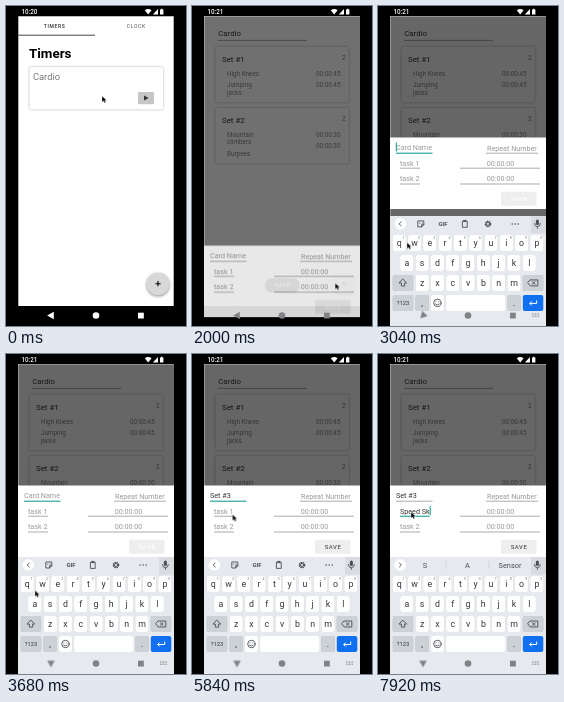
These frames come from a looping animation (180x320 px, 8000 ms). An HTML page:

```html
<!DOCTYPE html>
<html lang="en">
<head>
<meta charset="utf-8">
<title>Timers</title>
<style>
html, body { margin: 0; width: 100%; height: 100%; overflow: hidden; background: #000; }
svg { display: block; width: 100vw; height: 100vh; }
text { font-family: Roboto, Arial, sans-serif; white-space: pre; }
.mid { text-anchor: middle; }
.end { text-anchor: end; }
.card { fill: #fff; filter: drop-shadow(0 .6px 1px #0005); }
.head { font-size: 7.9px; fill: #333; }
.item { font-size: 6.35px; fill: #858585; }
.field { font-size: 7.2px; fill: #999; }
.rule { stroke: #888; stroke-width: .7; }
.focus { stroke: #009688; stroke-width: 1; }
.key { fill: #fff; filter: drop-shadow(0 .5px 0 #b5b8bd); }
.dark { fill: #ccd1d6; }
.letter { font-size: 8.8px; fill: #33363a; }
.tiny { font-size: 3.6px; fill: #777; }
.hint { font-size: 7.4px; fill: #4b4f54; }
.line { fill: none; stroke: #4b4f54; stroke-width: .9; stroke-linecap: round; stroke-linejoin: round; }
.a { animation: 8s linear infinite; }

#minute0 { animation-name: until4; }
#minute1 { animation-name: from4; }
#edit { animation-name: open; }
#ripple { animation-name: ripple; transform-origin: 146px 279px; }
#dim { animation-name: dim; }
#sheet { animation-name: sheet; }
#keys { animation-name: keys; }
#back { animation-name: back; transform-origin: 45px 309.5px; }
#hideKeys { animation-name: from37; }
#pointer { animation-name: pointer; }

@keyframes until4 { 0%, 3.99% { opacity: 1 } 4%, 100% { opacity: 0 } }
@keyframes from4 { 0%, 3.99% { opacity: 0 } 4%, 100% { opacity: 1 } }
@keyframes from37 { 0%, 37% { opacity: 0 } 37.5%, 100% { opacity: 1 } }
@keyframes open {
  0%, 7% { opacity: 0; transform: translateY(24px); animation-timing-function: ease-out }
  10%, 100% { opacity: 1; transform: none }
}
@keyframes ripple {
  0%, 21.5% { opacity: 0; transform: scale(.3) }
  23% { opacity: .8; transform: scale(.8) }
  25%, 100% { opacity: 0; transform: scale(1.6) }
}
@keyframes dim { 0%, 23.3% { opacity: 0 } 25% { opacity: .56 } 26.5%, 100% { opacity: .6 } }
@keyframes sheet {
  0%, 23.4% { opacity: 0; transform: translateY(189px) }
  25% { opacity: .84; transform: translateY(108.3px); animation-timing-function: ease-out }
  26.5%, 36% { opacity: 1; transform: translateY(97px) }
  37.4%, 100% { opacity: 1; transform: none }
}
@keyframes keys {
  0%, 36% { transform: translateY(118px); animation-timing-function: ease-out }
  38% { transform: translateY(7px) }
  39%, 100% { transform: none }
}
@keyframes back { 0%, 37% { transform: none } 39%, 100% { transform: rotate(-90deg) } }
@keyframes pointer {
  0%, 11% { transform: translate(96px, 90px); animation-timing-function: ease-in-out }
  20%, 23% { transform: translate(144.5px, 277.5px) }
  25.2% { transform: translate(143px, 277px); animation-timing-function: ease-in-out }
  28.6% { transform: translate(26px, 220px); animation-timing-function: ease-out }
  34%, 61% { transform: translate(29px, 236.5px); animation-timing-function: ease-in-out }
  68%, 79% { transform: translate(40.5px, 160.5px) }
  80.5%, 100% { transform: translate(33px, 158px) }
}
</style>
</head>
<body>
<svg viewBox="0 0 180 320" preserveAspectRatio="none">
  <clipPath id="screen"><rect x="12.3" y="10.3" width="155.4" height="309.7"/></clipPath>
  <rect width="180" height="320"/>

  <g fill="#fff" font-size="6.3" font-weight="500">
    <text id="minute0" class="a" x="15.4" y="8">10:20</text>
    <text id="minute1" class="a" x="15.4" y="8">10:21</text>
    <path d="M138.8 4.2q3.4-2.6 6.8 0l-3.4 4.2zM152 2.9v5.6h-5.2zM154 3.4h1v-.7h1.4v.7h1v5.1h-3.4z"/>
  </g>

  <g clip-path="url(#screen)">
    <rect x="12" y="10" width="156" height="290.5" fill="#fff"/>
    <g>
      <text class="mid" x="48.6" y="22" font-size="5" letter-spacing=".65" font-weight="500" fill="#333">TIMERS</text>
      <text class="mid" x="130.3" y="22" font-size="5" letter-spacing=".65" font-weight="500" fill="#777">CLOCK</text>
      <path d="M12 29.2H89" stroke="#333" stroke-width=".9"/>
      <text x="23" y="52" font-size="13.4" font-weight="700">Timers</text>
      <rect class="card" x="23.5" y="61" width="133.5" height="42.5" rx="1.5"/>
      <text x="27" y="74.2" font-size="9.3" fill="#777">Cardio</text>
      <rect x="132" y="86" width="16" height="12.3" rx="1" fill="#c6c6c6"/>
      <path d="M138 89.6v5l4.6-2.5z" fill="#333"/>
    </g>

    <g id="edit" class="a">
      <rect x="12" y="10" width="156" height="290.5" fill="#fff"/>
      <text x="26.3" y="30" font-size="7.8" fill="#333">Cardio</text>
      <path class="rule" d="M26 34.4H115"/>
      <rect class="card" x="23.5" y="40.8" width="133.3" height="55.5" rx="1.5"/>
      <rect class="card" x="23.5" y="102" width="133.3" height="55.5" rx="1.5"/>
      <g id="sets"></g>
      <rect x="73.2" y="272.2" width="34.2" height="14.2" rx="5.8"/>
      <text class="mid" x="90.5" y="281.4" font-size="5.9" letter-spacing=".4" font-weight="700" fill="#fff">SAVE</text>
    </g>

    <circle cx="152" cy="278" r="11.3" fill="#d8d8d8" style="filter:drop-shadow(0 1px 1.5px #0007)"/>
    <circle id="ripple" class="a" cx="146" cy="279" r="5" fill="#aaa"/>
    <path d="M149.4 277.7h5.2m-2.6-2.6v5.2" stroke="#000" stroke-width="1.1"/>

    <rect x="12" y="300" width="156" height="20"/>
    <rect id="dim" class="a" x="12" y="10" width="156" height="310"/>

    <g id="sheet" class="a">
      <rect x="12" y="131.5" width="156" height="71.5" fill="#fff"/>
      <text id="name" class="field" x="18" y="143.7"></text>
      <path id="nameRule" class="rule" d="M18 147.2H54.5"/>
      <text class="field" x="109" y="144.5">Repeat Number</text>
      <path class="rule" d="M108 147.2H160"/>
      <text id="task" class="field" x="22" y="159.5"></text>
      <path id="taskRule" class="rule"/>
      <text class="field" x="108.7" y="159.5">00:00:00</text>
      <path class="rule" d="M82 162.2H162"/>
      <text class="field" x="22" y="175">task 2</text>
      <text class="field" x="108.7" y="175">00:00:00</text>
      <path class="rule" d="M22 178H42M82 178H162"/>
      <rect x="123" y="185.8" width="35.5" height="14" rx="1.5" fill="#eee"/>
      <text id="save" class="mid" x="141" y="195.1" font-size="6" letter-spacing=".5" font-weight="500">SAVE</text>
      <path id="caret" stroke="#009688" stroke-width="1"/>
    </g>

    <g id="keys" class="a">
      <rect x="12" y="203" width="156" height="124.5" fill="#e6e9ed"/>
      <rect x="153" y="203" width="15" height="17.5" fill="#d8dbdf"/>
      <circle cx="22.3" cy="211" r="5.8" fill="#fff"/>
      <path id="chevron" class="line"/>
      <g id="tools">
        <path class="line" d="M40.2 208h5.6v3.8l-2.2 2.2h-3.4zM45.8 211.8h-2.2v2.2M41.6 210.2h.3m2.2 0h.3M84.8 208.2h4.4v6.2h-4.4zM86 207.4h2v1.2h-2z"/>
        <text class="mid" x="65" y="213.3" font-size="6" font-weight="700" fill="#4b4f54">GIF</text>
        <circle class="line" cx="110" cy="211" r="2.6" style="stroke-width:1.4;stroke-dasharray:1.5 .6;stroke-linecap:butt"/>
        <circle class="line" cx="110" cy="211" r="1.6"/>
        <path d="M134.2 211h.01m3 0h.01m3 0h.01" class="line" style="stroke-width:1.5"/>
      </g>
      <g id="hints">
        <path d="M68 207v8M111 207v8" stroke="#c4c7cb" stroke-width=".6"/>
        <text class="hint mid" x="47" y="213.5"></text>
        <text class="hint mid" x="89.5" y="213.5"></text>
        <text class="hint mid" x="132" y="213.5"></text>
        <g id="emoji">
          <path d="M128.5 207l8 6.5-7 1.5z" fill="#332e1c"/>
          <path d="M129 208l3 5-2 1.5z" fill="#d9b33c"/>
        </g>
      </g>
      <rect x="157.9" y="206.5" width="3" height="5.6" rx="1.5" fill="#4b4f54"/>
      <path class="line" d="M156.5 210.5q0 3.2 2.9 3.2t2.9-3.2M159.4 213.7v1.6"/>
      <g id="board"></g>
      <path class="line" d="M25 266.3l3.6 3.8h-2v3h-3.2v-3h-2zM152.3 267h7.5v6h-7.5l-2.4-3zM154.4 268.7l2.7 2.7m0-2.7l-2.7 2.7"/>
      <circle class="line" cx="59.4" cy="290" r="3.7"/>
      <path class="line" d="M57.6 291.2q1.8 1.8 3.6 0M58 288.9h.01m2.8 0h.01"/>
      <path d="M158.7 287.5v3h-7m2-2l-2 2 2 2" fill="none" stroke="#fff" stroke-width="1"/>
    </g>
  </g>

  <g id="nav">
    <path id="back" class="a" d="M41.2 309.5l6.6-3.8v7.6z"/>
    <circle cx="90" cy="309.5" r="3.3"/>
    <rect x="132" y="306.7" width="5.8" height="5.8"/>
    <path id="hideKeys" class="a" d="M154 308h7m-7 2.2h7" stroke="#888" stroke-width="1" stroke-dasharray="1 .5"/>
  </g>
  <path id="pointer" class="a" d="M0 0v6.2l1.5-1.3 1.1 2.2 1.2-.6-1-2.1h2z" stroke="#fff" stroke-width=".4"/>
</svg>

<script>
const $ = id => document.getElementById(id);
const label = (cls, x, y, s) => `<text class="${cls}" x="${x}" y="${y}">${s}</text>`;

const set = (y, title, tasks, times) =>
  label('head', 30, y + 14.8, title) +
  label('item end', 153.7, y + 12.7, '2') +
  tasks.map(([s, dy]) => label('item', 35, y + dy, s)).join('') +
  times.map(([s, dy]) => label('item end', 148.5, y + dy, s)).join('');

$('sets').innerHTML =
  set(41, 'Set #1', [['High Knees', 29.4], ['Jumping', 40.2], ['jacks', 47.6]],
    [['00:00:45', 29.4], ['00:00:45', 40.2]]) +
  set(102, 'Set #2', [['Mountain', 28.8], ['climbers', 36.2], ['Burpees', 47.6]],
    [['00:00:30', 28.8], ['00:00:30', 40]]);

// cx, cy: centre of the key
const key = (cx, cy, w, s = '', cls = '') =>
  `<rect class="key ${cls}" x="${cx - w / 2}" y="${cy - 8}" width="${w}" height="16" rx="2"/>` +
  label('letter mid', cx, cy + 3, s);

const row = (letters, x, y) =>
  [...letters].map((c, i) => key(x + i * 15.3, y, 13.4, c)).join('');

$('board').innerHTML =
  row('qwertyuiop', 21.2, 230) + row('asdfghjkl', 28.8, 250) + row('zxcvbnm', 44.2, 270) +
  [...'1234567890'].map((d, i) => label('tiny mid', 25.6 + i * 15.3, 226, d)).join('') +
  key(25, 270, 20.5, '', 'dark') + key(155, 270, 20.5, '', 'dark') +
  key(25, 290, 20.5, '', 'dark') + label('mid', 25, 292, '<tspan font-size="5.8" fill="#33363a">?123</tspan>') +
  key(44.2, 290, 13.4, ',', 'dark') + key(59.4, 290, 13.4) + key(97.7, 290, 60) +
  key(136, 290, 13.4, '.', 'dark') +
  '<rect x="144.8" y="282" width="20.5" height="16" rx="2" fill="#1070f0"/>';

const name = { text: 'Set #3', at: [3700, 3880, 4060, 4240, 4480, 5000], x: 18, y: 141 };
const task = { text: 'Speed Sk', at: [6560, 6720, 6880, 7040, 7200, 7360, 7600, 7840], x: 22, y: 156.7 };
const NAME_FOCUS = 2880, TASK_FOCUS = 6000;

// Suggestions by start time; null shows the tool icons
const hints = [
  [0, null], [3700, ['Set', 'See', 'Send']], [4240, ['a', 'up', '']], [5000, null],
  [6560, ['Speed', 'Speech', 'Spend']], [7360, ['S', 'A', 'Sensor']]
];
const words = $('hints').querySelectorAll('text');
const show = (el, on) => { el.style.display = on ? '' : 'none'; };

function type(id, field, placeholder, t) {
  const n = field.at.filter(k => k <= t).length, el = $(id);
  el.textContent = n ? field.text.slice(0, n) : placeholder;
  el.style.fill = n ? '#333' : '#999';
  return { n, width: el.getComputedTextLength() };
}

function draw() {
  const t = performance.now() % 8000;
  const a = type('name', name, 'Card Name', t);
  const b = type('task', task, 'task 1', t);
  const onTask = t >= TASK_FOCUS, onName = t >= NAME_FOCUS && !onTask;

  $('nameRule').setAttribute('class', onName ? 'focus' : 'rule');
  $('taskRule').setAttribute('class', onTask ? 'focus' : 'rule');
  $('taskRule').setAttribute('d', `M22 162.2h${Math.max(20, b.width)}`);
  $('save').style.fill = a.n ? '#555' : '#fff';

  const f = onTask ? task : name, m = onTask ? b : a;
  const since = t - (m.n ? f.at[m.n - 1] : onTask ? TASK_FOCUS : NAME_FOCUS);
  show($('caret'), (onName || onTask) && since % 1000 < 500);
  $('caret').setAttribute('d', `M${f.x + (m.n ? m.width + .5 : .3)} ${f.y - 4.5}v9`);

  const list = hints.filter(h => h[0] <= t).pop()[1];
  show($('tools'), !list);
  show($('hints'), list);
  if (list) words.forEach((w, i) => { w.textContent = list[i]; });
  show($('emoji'), list && !list[2]);
  $('chevron').setAttribute('d', list ? 'M21.4 209l2 2-2 2' : 'M23.2 209l-2 2 2 2');
  $('nav').style.fill = t < 1760 ? '#fff' : '#808285';
  requestAnimationFrame(draw);
}
draw();
</script>
</body>
</html>
```
